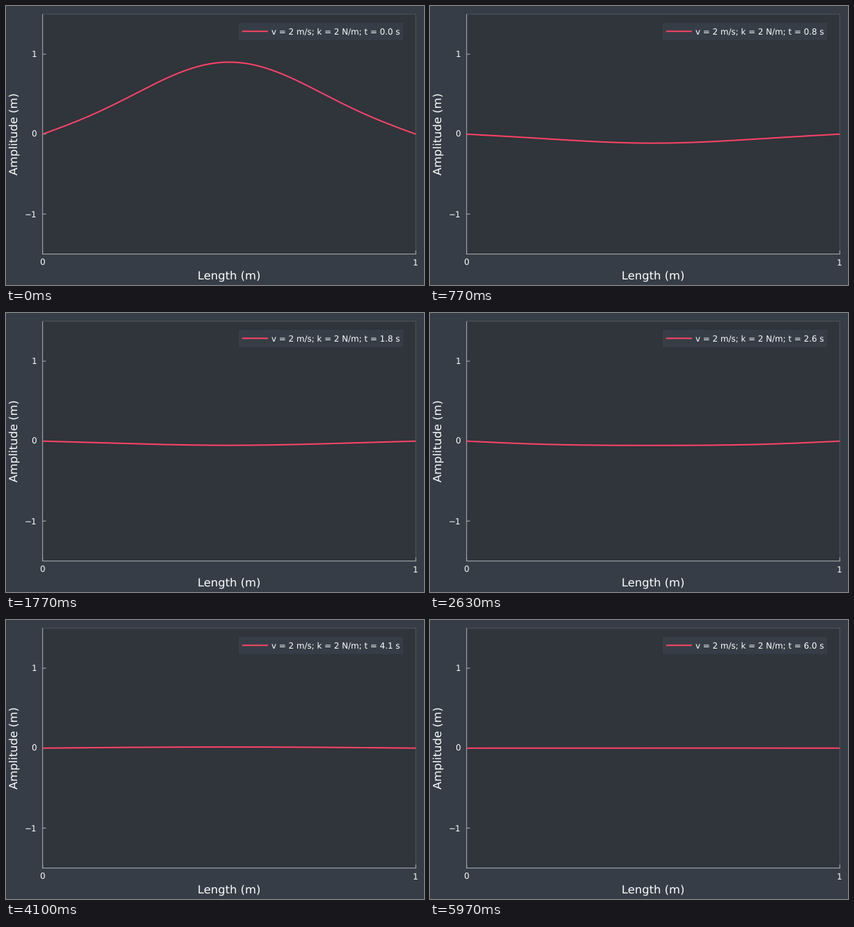
Animation, 600 px wide and 400 px high, one loop 6.03 s. Source, as a matplotlib script:

```python
import matplotlib.pyplot as plt
import numpy as np
from matplotlib.animation import FuncAnimation
from matplotlib.patches import Rectangle

W, H, DPI = 600, 400, 100
PX = 72 / DPI                      # points per pixel
LOOP, STEP = 6030, 15              # ms
FPS, LAST = 30, 180                # the wave itself advances 30 times a second

BG, PANEL = "#363d46", "#30343b"
AXIS, FAINT, RED = "#adb2b7", "#54585e", "#fe4365"
LEFT, RIGHT, TOP, BOTTOM = 52.6, 588.2, 11.8, 355.6
ZERO, UNIT = (TOP + BOTTOM) / 2, (BOTTOM - TOP) / 3

SPEED, DAMPING = 2, 2
MODES = (1, 3)                     # sine terms kept of a string plucked mid-way

plt.rcParams["font.family"] = "DejaVu Sans"
plt.rcParams["text.hinting"] = "none"
fig = plt.figure(figsize=(W / DPI, H / DPI), dpi=DPI, facecolor=BG)
ax = fig.add_axes([0, 0, 1, 1])
ax.set(xlim=(0, W), ylim=(H, 0))
ax.axis("off")


def box(x0, y0, x1, y1, color):
    ax.add_patch(Rectangle((x0, y0), x1 - x0, y1 - y0, fc=color, lw=0))


def line(xs, ys, color=AXIS, width=1, z=2):
    return ax.plot(xs, ys, color=color, lw=width * PX, zorder=z, snap=False,
                   solid_capstyle="butt")[0]


def label(x, y, text, size=11.9, ha="center", **kw):
    return ax.text(x, y, text, size=size * PX, color="white", ha=ha,
                   va="baseline", zorder=6, **kw)


def wave(x, t):
    """Damped plucked string as a short Fourier series."""
    u = np.zeros_like(x)
    for n in MODES:
        amp = 8 / (n * np.pi) ** 2 * np.sin(n * np.pi / 2)
        w = np.sqrt((n * np.pi * SPEED) ** 2 - (DAMPING / 2) ** 2)
        swing = np.cos(w * t) + DAMPING / w * np.sin(w * t)
        u += amp * np.sin(n * np.pi * x) * swing
    return u * np.exp(-DAMPING / 2 * t)


box(LEFT, TOP, RIGHT, BOTTOM, PANEL)
line([LEFT, RIGHT], [TOP, TOP], FAINT)
line([RIGHT, RIGHT], [TOP, BOTTOM], FAINT)
line([LEFT, LEFT], [TOP, BOTTOM + 0.5])
line([LEFT, RIGHT + 0.5], [BOTTOM, BOTTOM])

for value, name in ((1, "1"), (0, "0"), (-1, "\u22121")):
    y = ZERO - value * UNIT
    line([LEFT, LEFT + 5], [y, y])
    label(44, y + 4.3, name, ha="right")
for x, name in ((LEFT, "0"), (RIGHT, "1")):
    line([x, x], [BOTTOM, BOTTOM - 5])
    label(x - 0.5, 372, name)

label((LEFT + RIGHT) / 2, 392, "Length (m)", 16.4)
label(17, 183, "Amplitude (m)", 16.4, rotation=90, rotation_mode="anchor")

box(334, 24, 570, 49, BG)
line([339, 376], [36.3, 36.3], RED, 2)
legend = label(380.8, 41, "", ha="left")

pos = np.linspace(0, 1, 201)
string = line(LEFT + pos * (RIGHT - LEFT), pos * 0 + ZERO, RED, 2, z=5)


def update(i):
    # steps of the wave fall on whole hundredths of a second
    ms = (i * STEP + STEP - 1) // 10 * 10
    t = min(LAST, (ms + 5) * FPS // 1000) / FPS
    string.set_ydata(ZERO - UNIT * wave(pos, t))
    legend.set_text(f"v = {SPEED} m/s; k = {DAMPING} N/m; t = {t:.1f} s")
    return string, legend


anim = FuncAnimation(fig, update, frames=LOOP // STEP, interval=STEP,
                     repeat=True, repeat_delay=0, blit=False)
plt.show()
```
